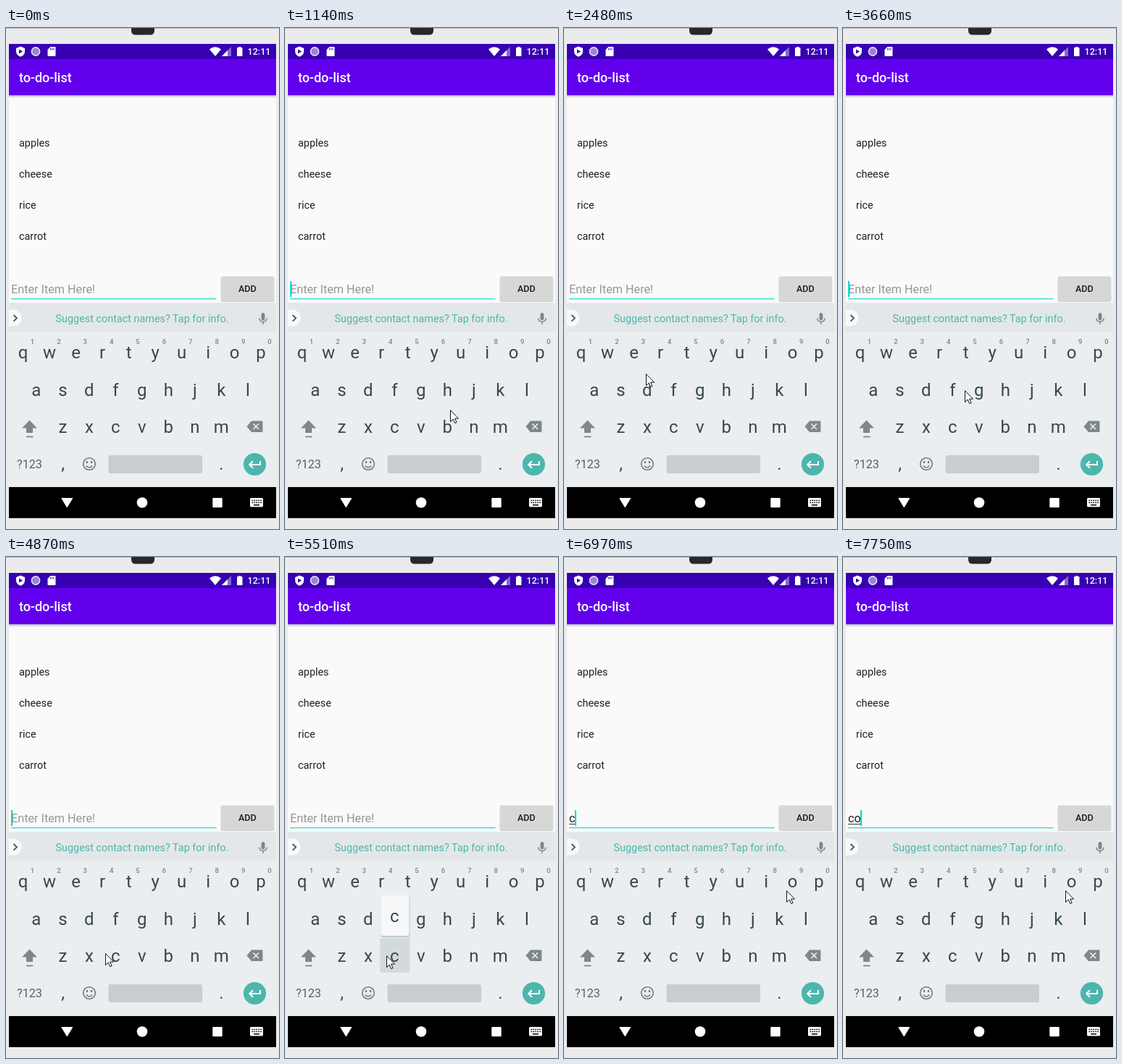
Recreate the animation shown at these times as an HTML page. Size 377 by 693 pixels, loop 8000 ms.

```html
<!DOCTYPE html>
<html lang="en">
<head>
<meta charset="utf-8">
<title>to-do-list</title>
<style>
  html, body { margin: 0; width: 100%; height: 100%; overflow: hidden; background: #ebebeb; }
  svg { display: block; width: 377px; height: 693px; font-family: Roboto, sans-serif; }
  .item { font-size: 14.4px; fill: #212121; }
  .field { font-size: 16.2px; }
  .key { font-size: 24px; fill: #37474f; text-anchor: middle; }
  .num { font-size: 9.6px; font-weight: 500; fill: #78848a; text-anchor: middle; }
  .bold { font-weight: 500; }
</style>
</head>
<body>
<svg viewBox="0 0 377 693">
  <defs>
    <linearGradient id="shade" x2="0" y2="1">
      <stop stop-color="#000" stop-opacity=".25"/>
      <stop offset="1" stop-color="#000" stop-opacity="0"/>
    </linearGradient>
  </defs>

  <!-- device frame -->
  <rect width="377" height="1" fill="#bdbdbd"/>
  <path d="M173 0h32v3.500q0 6-6 6h-20q-6 0-6-6z" fill="#282828"/>
  <rect x="4" y="22" width="369" height="656" fill="#fafafa"/>

  <!-- status bar -->
  <rect x="4" y="22" width="369" height="21" fill="#3700b3"/>
  <g fill="#fff">
    <path d="M20 25.500l6 2.400v4.300q0 5.300-6 7.600q-6-2.300-6-7.600v-4.300z"/>
    <path d="M18 29.500l5 3-5 3z" fill="#3700b3"/>
    <circle cx="41" cy="32.500" r="5.600" fill="#9c82d8" stroke="#e6defa" stroke-width="1.600"/>
    <path d="M61.500 26h6q1 0 1 1v11q0 1-1 1h-9q-1 0-1-1v-8z"/>
    <path d="M61.500 28v2.500M63.700 28v2.500M65.900 28v2.500" stroke="#3700b3"/>
    <path d="M281 29.500q8-6.500 16 0l-8 9.500z"/>
    <path d="M311 26v13h-13z" opacity=".4"/>
    <path d="M306 31v8h-8z"/>
    <path d="M321 26h3.500v1.300h2v11.700h-7.500v-11.700h2z"/>
    <text x="333.500" y="37.300" font-size="12.600" class="bold">12:11</text>
  </g>

  <!-- app bar -->
  <rect x="4" y="43" width="369" height="50" fill="#6200ee"/>
  <rect x="4" y="93" width="369" height="4" fill="url(#shade)"/>
  <text x="18" y="75.400" font-size="18" class="bold" fill="#fff">to-do-list</text>

  <g id="list" class="item"></g>

  <!-- input row -->
  <text id="hint" class="field" x="7" y="367" fill="#979797">Enter Item Here!</text>
  <text id="typed" class="field" x="7" y="367" fill="#212121"></text>
  <rect id="under" x="7" y="369" height="1" fill="#333"/>
  <rect x="7" y="374" width="283.500" height="1.200" fill="#1fd6c6"/>
  <rect id="caret" y="350" width="2" height="22" fill="#03dac5"/>
  <rect x="296.500" y="344" width="74" height="35" rx="2.500" fill="#000" opacity=".16"/>
  <rect x="297" y="343.500" width="73" height="34" rx="2" fill="#d6d7d7"/>
  <text x="333.300" y="364.500" font-size="12.600" class="bold" fill="#1c1c1c" text-anchor="middle">ADD</text>

  <!-- suggestion strip -->
  <rect x="4" y="380" width="369" height="255" fill="#eaeef0"/>
  <rect x="4" y="380" width="369" height="40" fill="#e3e7e9"/>
  <path d="M4 389.500h6a11.500 11.500 0 0 1 0 23h-6z" fill="#f7f9fa"/>
  <path d="M10.500 397l4.500 4.300-4.500 4.300" fill="none" stroke="#4a5257" stroke-width="1.800"/>
  <text x="68.500" y="407" font-size="14.400" fill="#4db6ac">Suggest contact names? Tap for info.</text>
  <g stroke="#7b858a" fill="none">
    <path d="M355 396.500v5.500" stroke-width="4.800" stroke-linecap="round"/>
    <path d="M349.800 401.500a5.200 5 0 0 0 10.400 0M355 406.500v3.500" stroke-width="1.500"/>
  </g>

  <!-- keyboard -->
  <g id="keys"></g>
  <path d="M32.500 542.500l10.500 11h-6v6.500h-9v-6.500h-6z" fill="#7d878c"/>
  <rect x="28" y="564.500" width="9.500" height="1.800" fill="#7d878c"/>
  <path d="M339 543.500h14.500q1 0 1 1v13.500q0 1-1 1h-14.500l-6.500-7.700z" fill="#7d878c"/>
  <path d="M341.500 547.500l7.500 7.500m0-7.500l-7.500 7.500" stroke="#eaeef0" stroke-width="1.700"/>
  <text x="32.500" y="609" font-size="16.200" fill="#566168" text-anchor="middle">?123</text>
  <g stroke="#6f7a80" fill="none" stroke-width="1.600">
    <circle cx="115" cy="603" r="8.300"/>
    <path d="M110.800 605.500q4.200 5 8.400 0"/>
    <path d="M112 599v3M118 599v3" stroke-width="2.200"/>
  </g>
  <rect x="141.500" y="591" width="129.500" height="25" rx="3" fill="#c9cdd0"/>
  <circle cx="343.500" cy="603.500" r="15.600" fill="#4db6ac"/>
  <path d="M351 599v5h-14.500M341 599.200l-4.800 4.800 4.800 4.800" fill="none" stroke="#fff" stroke-width="2"/>

  <!-- navigation bar -->
  <rect x="4" y="635" width="369" height="43"/>
  <g fill="#fff">
    <path d="M77 650h14.500q1 0 .5 1l-7 11.500q-.7 1-1.400 0l-7-11.500q-.5-1 .4-1z"/>
    <circle cx="188" cy="656.500" r="7.300"/>
    <rect x="285.300" y="650" width="13.400" height="13.300" rx="1"/>
    <rect x="337" y="650" width="18" height="12.500" rx="1.500"/>
    <path d="M339.500 653.500h13.500M339.500 656.500h13.500" stroke="#000" stroke-width="1.600" stroke-dasharray="1.700 1.250"/>
    <path d="M342 659.800h8" stroke="#000" stroke-width="1.500"/>
  </g>

  <!-- key preview, placed relative to the letter of its key -->
  <g id="popup" visibility="hidden">
    <rect x="-20" y="-33" width="41" height="48" rx="2" fill="#d3dade"/>
    <text class="key"></text>
    <rect x="-19" y="-91" width="40" height="57" rx="3" fill="#000" opacity=".16"/>
    <rect x="-19" y="-92" width="39" height="56" rx="3" fill="#f5f7f8"/>
    <text class="key" y="-55"></text>
  </g>

  <path id="mouse" d="M.5.700v15.800l3.700-3.500 2.500 5.500 2.400-1-2.500-5.400h5z" fill="#fff" stroke="#111" stroke-linejoin="round"/>
</svg>

<script>
const LOOP = 8000;
const TICK = 132;      // the pointer is redrawn once per tick
const BLINK = 480;
const $ = id => document.getElementById(id);

function label(parent, text, x, y, cls) {
  const el = document.createElementNS('http://www.w3.org/2000/svg', 'text');
  el.setAttribute('x', x);
  el.setAttribute('y', y);
  el.setAttribute('class', cls);
  el.textContent = text;
  parent.append(el);
}

['apples', 'cheese', 'rice', 'carrot'].forEach((s, i) => label($('list'), s, 18, 163.5 + 43 * i, 'item'));

const keyAt = {};
['qwertyuiop', 'asdfghjkl', 'zxcvbnm'].forEach((row, r) => [...row].forEach((c, i) => {
  keyAt[c] = [23.6 + 36.5 * (i + r * (r + 1) / 4), 457 + 51.5 * r];
  label($('keys'), c, ...keyAt[c], 'key');
}));
[...'1234567890'].forEach((c, i) => label($('keys'), c, 36.5 + 36.4 * i, 437, 'num'));
[[',', 78.5], ['.', 297.5]].forEach(([c, x]) => label($('keys'), c, x, 611, 'key'));

// Pointer stops: tick, x, y, ease-out power (1 if left out)
const stops = [
  [-4, 192, 179], [-3, 164, 202], [-1, 164, 202], [2, 162, 622], [3, 228, 528], [6, 272, 366],
  [8, 225, 329], [12, 122, 354], [13, 113, 478], [14, 108, 521], [18, 170, 462], [20, 168, 501],
  [22, 168, 501], [24, 127, 501], [31, 137, 548, 3], [34, 140, 551], [39, 140, 551], [48, 307, 461, 3]
];

// Field content: since when, text
const entries = [[750, ''], [5750, 'c'], [7630, 'co']];

const show = (el, on) => el.setAttribute('visibility', on ? 'visible' : 'hidden');
const move = (el, x, y) => el.setAttribute('transform', `translate(${x} ${y})`);

function pointer(tick) {
  const next = stops.findIndex(s => s[0] > tick);
  if (next < 0) return stops.at(-1).slice(1, 3);
  const [t0, x0, y0] = stops[next - 1];
  const [t1, x1, y1, power = 1] = stops[next];
  const k = 1 - (1 - (tick - t0) / (t1 - t0)) ** power;
  return [x0 + (x1 - x0) * k, y0 + (y1 - y0) * k].map(Math.round);
}

function draw(t) {
  show($('mouse'), t >= 280);
  if (t >= 280) move($('mouse'), ...pointer(Math.floor((t - 725) / TICK)));

  // Typing restarts the caret's blink
  const [since, text] = entries.findLast(e => e[0] <= t) || [LOOP, ''];
  const caretX = Math.floor(7 + 8.5 * text.length);
  $('typed').textContent = text;
  show($('hint'), !text);
  $('under').setAttribute('width', text ? caretX - 6 : 0);
  $('caret').setAttribute('x', caretX);
  show($('caret'), t >= since && (t - since) % (2 * BLINK) < BLINK);

  // A key is held shortly before and after its letter appears
  const press = entries.find(([at, s]) => s && t >= at - 245 && t < at + 120);
  show($('popup'), press);
  if (press) {
    const letter = press[1].at(-1);
    move($('popup'), ...keyAt[letter]);
    for (const el of $('popup').querySelectorAll('text')) el.textContent = letter;
  }
}

const start = performance.now();
function loop() {
  draw((performance.now() - start) % LOOP);
  requestAnimationFrame(loop);
}
loop();
</script>
</body>
</html>
```
